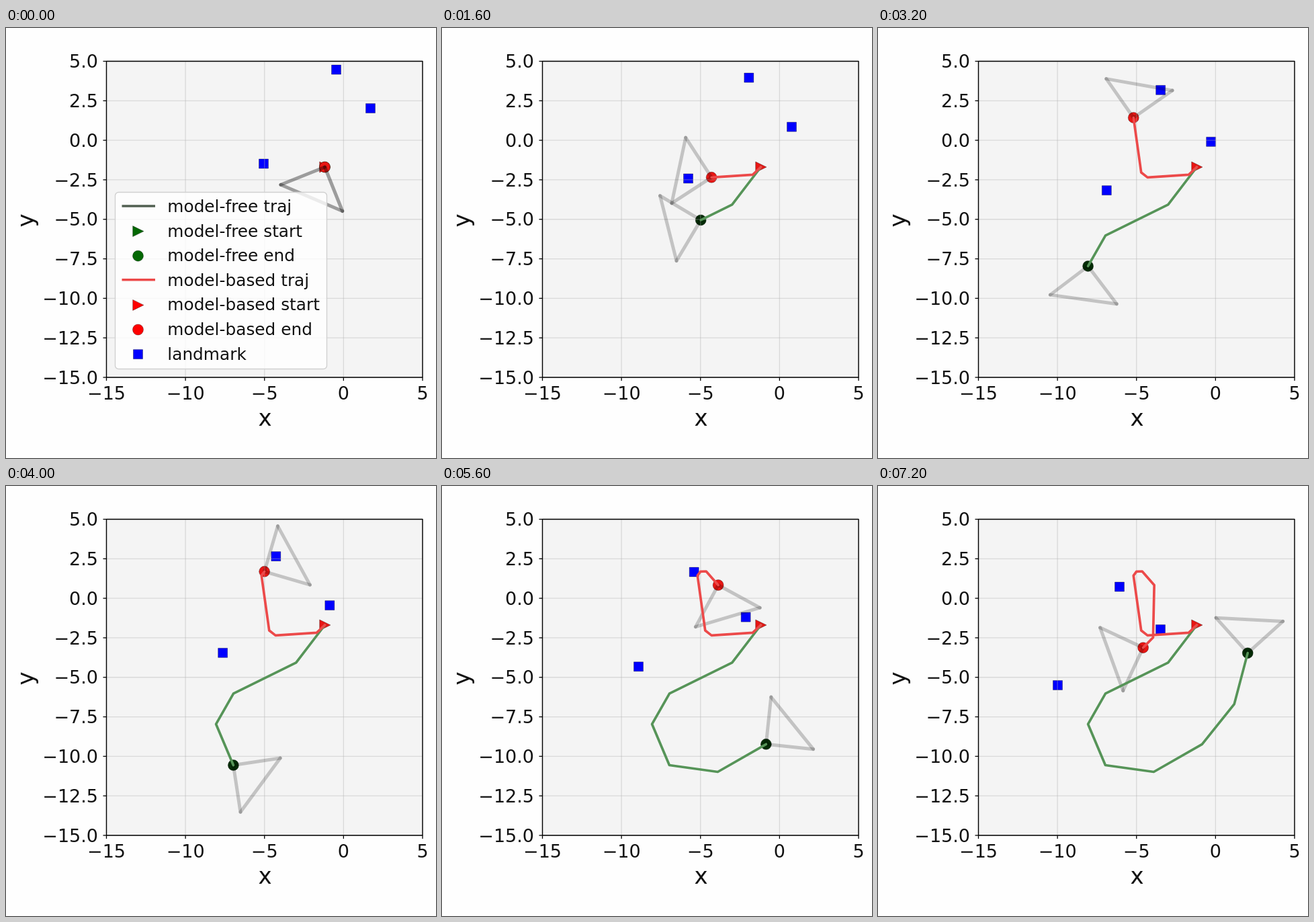
An HTML page with a canvas for the animation above (8000 ms loop, 640 by 640 pixels).

```html
<!DOCTYPE html>
<html>
<head>
<meta charset="utf-8">
<style>
html, body { margin: 0; height: 100%; overflow: hidden; background: #fefefe; }
canvas { display: block; }
</style>
</head>
<body>
<canvas id="stage" width="640" height="640"></canvas>
<script>
const ctx = document.getElementById('stage').getContext('2d');
const STEP_MS = 800, STEPS = 10;
const LEFT = 149.5, TOP = 49.5, SIZE = 470.5;
const RIGHT = LEFT + SIZE, BOTTOM = TOP + SIZE;
const START = { x: 474.5, y: 207, heading: 113.2 };
const VIEW_LENGTH = 70.6;

const RED = '#e81614', RED_LINE = '#ec4a4a', BLUE = '#00f';
const EARLY_GREEN = { marker: '#046804', line: '#526052' };
const LATE_GREEN = { marker: '#042c06', line: '#569458' };

const radians = degrees => degrees * Math.PI / 180;

// Drive commands [distance, turn]; each move follows the mean of the old and new heading.
function drive(commands) {
  const poses = [START];
  for (const [distance, turn] of commands) {
    const { x, y, heading } = poses.at(-1);
    const course = radians(heading + turn / 2);
    poses.push({
      x: x + distance * Math.cos(course),
      y: y + distance * Math.sin(course),
      heading: heading + turn
    });
  }
  return poses;
}

const modelFree = drive([
  [70.3, 28.4], [52, 24.2], [52, -24.2], [52.4, -43.8], [66.3, -61.4],
  [72.7, -57], [82.9, -18.4], [76.5, -24.5], [78.6, -23.5]
]);
const modelBased = drive([
  [16.6, 47.3], [61.4, 31.5], [11.9, 52], [82.4, 36], [7.5, 51.3],
  [8.5, 52.7], [27.3, 49.5], [78, 35.5], [21.2, 51]
]);

// Key points of each drifting landmark, three steps apart.
const landmarks = [
  [[383.5, 202], [358, 235], [305, 255], [267.5, 296.5]],
  [[491.5, 62], [439.5, 80], [383, 117], [359.5, 150]],
  [[542.5, 119.5], [509.5, 161], [468, 186], [420.5, 213.5]]
];

function landmarkAt(keys, step) {
  const i = Math.min(Math.floor(step / 3), keys.length - 2);
  const t = step / 3 - i;
  return keys[i].map((v, axis) => v + (keys[i + 1][axis] - v) * t);
}

function polyline(points, color, width) {
  ctx.beginPath();
  points.forEach(p => ctx.lineTo(...p));
  ctx.strokeStyle = color;
  ctx.lineWidth = width;
  ctx.stroke();
}

function marker(shape, x, y, color) {
  ctx.beginPath();
  if (shape === 'circle') ctx.arc(x, y, 8, 0, 2 * Math.PI);
  if (shape === 'square') ctx.rect(x - 7, y - 7, 14, 14);
  if (shape === 'triangle') {
    ctx.moveTo(x - 7.8, y - 8);
    ctx.lineTo(x + 8.5, y);
    ctx.lineTo(x - 7.8, y + 8);
    ctx.closePath();
  }
  ctx.fillStyle = color;
  ctx.fill();
  ctx.strokeStyle = 'rgba(0,0,0,.4)';
  ctx.lineWidth = 0.8;
  ctx.stroke();
}

function text(str, x, y, size, align) {
  ctx.font = `${size}px "DejaVu Sans", sans-serif`;
  ctx.textAlign = align;
  ctx.fillStyle = '#111';
  ctx.fillText(str, x, y);
}

const signed = str => str.replace('-', '\u2212');

function drawBackground() {
  ctx.fillStyle = '#fefefe';
  ctx.fillRect(0, 0, 640, 640);
  ctx.fillStyle = '#f4f4f4';
  ctx.fillRect(LEFT, TOP, SIZE, SIZE);
}

function drawAxes() {
  const grid = 'rgba(176,176,176,.4)';
  for (let i = 0; i <= 4; i++) {
    const x = LEFT + SIZE * i / 4;
    polyline([[x, TOP], [x, BOTTOM]], grid, 1.3);
    polyline([[x, BOTTOM], [x, BOTTOM + 5]], '#000', 1.3);
    text(signed(String(5 * i - 15)), x, 553, 27, 'center');
  }
  for (let i = 0; i <= 8; i++) {
    const y = TOP + SIZE * i / 8;
    polyline([[LEFT, y], [RIGHT, y]], grid, 1.3);
    polyline([[LEFT - 5, y], [LEFT, y]], '#000', 1.3);
    text(signed((5 - 2.5 * i).toFixed(1)), 137, y + 9.7, 27, 'right');
  }
  text('x', 385.5, 592, 34, 'center');
  ctx.save();
  ctx.translate(41, 286.5);
  ctx.rotate(-Math.PI / 2);
  text('y', 0, 0, 34, 'center');
  ctx.restore();
}

// Field of view: three translucent edges whose ends overlap.
function drawView({ x, y, heading }) {
  const corner = offset => {
    const angle = radians(heading + offset);
    return [x + VIEW_LENGTH * Math.cos(angle), y + VIEW_LENGTH * Math.sin(angle)];
  };
  const apex = [x, y], a = corner(-45), b = corner(45);
  [[apex, a], [apex, b], [a, b]].forEach(edge => polyline(edge, 'rgba(0,0,0,.2)', 5));
}

function drawTrajectory(poses, step, color) {
  polyline(poses.slice(0, step + 1).map(p => [p.x, p.y]), color, 3.7);
}

function drawLegend(green) {
  ctx.beginPath();
  ctx.roundRect(162.5, 244.5, 315, 263, 5);
  ctx.fillStyle = 'rgba(255,255,255,.8)';
  ctx.fill();
  ctx.strokeStyle = '#d0d0d0';
  ctx.lineWidth = 1.4;
  ctx.stroke();
  const rows = [
    ['model-free traj', 'line', green.line],
    ['model-free start', 'triangle', green.marker],
    ['model-free end', 'circle', green.marker],
    ['model-based traj', 'line', RED_LINE],
    ['model-based start', 'triangle', '#f00'],
    ['model-based end', 'circle', '#f00'],
    ['landmark', 'square', BLUE]
  ];
  rows.forEach(([label, shape, color], i) => {
    const y = 265 + 36.6 * i;
    if (shape === 'line') polyline([[172.5, y], [222, y]], color, 3.5);
    else marker(shape, 196.5, y + 1, color);
    text(label, 240.3, y + 9, 24.8, 'left');
  });
}

function draw(step) {
  const green = step < 2 ? EARLY_GREEN : LATE_GREEN;
  const free = modelFree[step], based = modelBased[step];
  ctx.lineCap = 'butt';
  ctx.lineJoin = 'miter';
  drawBackground();
  landmarks.forEach(keys => marker('square', ...landmarkAt(keys, step), BLUE));
  marker('triangle', START.x, START.y, RED);
  marker('circle', free.x, free.y, green.marker);
  marker('circle', based.x, based.y, RED);
  drawAxes();

  ctx.lineCap = ctx.lineJoin = 'round';
  drawView(free);
  drawView(based);
  if (step > 0) {
    drawTrajectory(modelFree, step, green.line);
    drawTrajectory(modelBased, step, RED_LINE);
  }

  ctx.lineCap = 'butt';
  ctx.strokeStyle = '#000';
  ctx.lineWidth = 1.4;
  ctx.strokeRect(LEFT, TOP, SIZE, SIZE);
  if (step === 0) drawLegend(green);
}

function tick() {
  draw(Math.floor(performance.now() / STEP_MS) % STEPS);
  requestAnimationFrame(tick);
}
tick();
</script>
</body>
</html>
```
